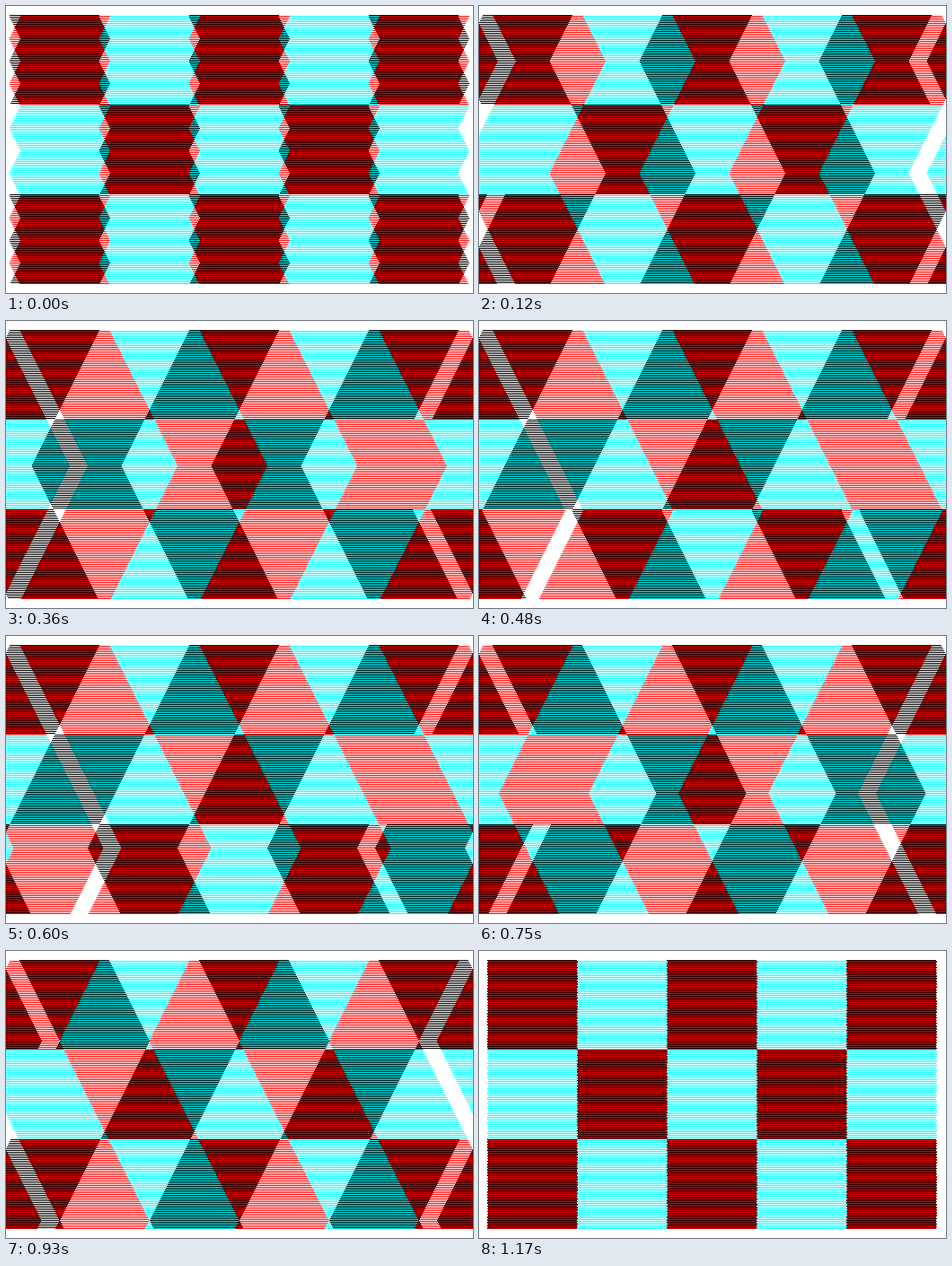
These frames come from a looping animation (520 px wide and 320 px high, 1200 ms). An HTML page with a canvas:

```html
<!DOCTYPE html>
<html>
<head>
<meta charset="utf-8">
<style>
  html, body { margin: 0; overflow: hidden; background: #fff; }
  canvas { display: block; }
</style>
</head>
<body>
<canvas width="520" height="320"></canvas>
<script>
const ctx = document.querySelector('canvas').getContext('2d');
const WIDTH = 520, HEIGHT = 320, CELL = 100, MARGIN = 10;
const STEP_MS = 30, STEPS = 40;
// [light, dark] for the even and the odd scan lines
const INKS = [['#fff', '#000'], ['#0ff', '#f00']];

// Bounces a steadily growing value between -limit and limit
function bounce(value, limit) {
  const phase = (value + limit) % (4 * limit);
  return phase < 2 * limit ? phase - limit : 3 * limit - phase;
}

function drawLine(line, shift) {
  const row = Math.floor(line / CELL);
  const inks = INKS[line % 2];
  for (let col = 0; col < 5; col++) {
    const x = (MARGIN + col * CELL + shift + WIDTH) % WIDTH;
    ctx.fillStyle = inks[(row + col + 1) % 2];
    ctx.fillRect(x, MARGIN + line, CELL, 1);
    ctx.fillRect(x - WIDTH, MARGIN + line, CELL, 1);
  }
}

function draw(step) {
  const level = 20 - Math.abs(step - 19);
  const limit = Math.max(0.7, 6.25 * level);
  const side = level % 2 ? 1 : -1;
  ctx.fillStyle = '#fff';
  ctx.fillRect(0, 0, WIDTH, HEIGHT);
  for (let line = 0; line < 3 * CELL; line++) {
    const swing = bounce(line / 2 + 5.5 + side / 2, limit);
    drawLine(line, Math.floor(swing * side * (line % 2 ? 1 : -1)));
  }
}

const start = performance.now();
function tick() {
  draw(Math.floor((performance.now() - start) / STEP_MS) % STEPS);
  requestAnimationFrame(tick);
}
tick();
</script>
</body>
</html>
```
